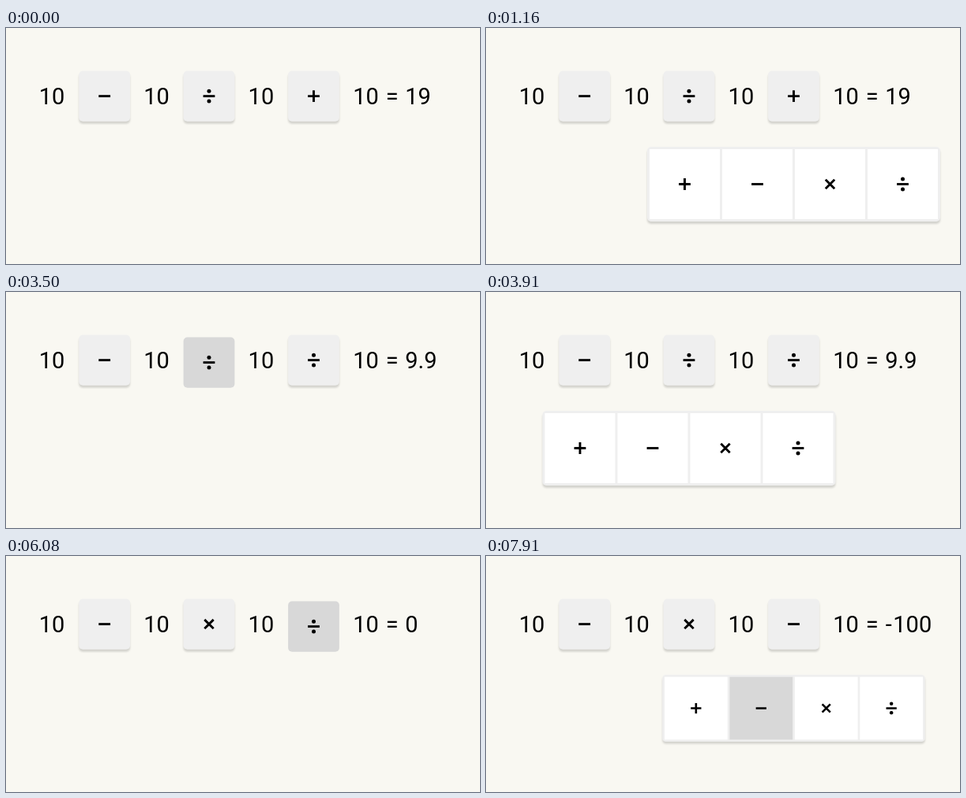
Recreate the animation shown at these times as an HTML page. Size 600 by 300 pixels, loop 8000 ms.

```html
<!DOCTYPE html>
<html lang="en">
<head>
<meta charset="utf-8">
<title>Operator picker</title>
<style>
  html, body { margin: 0; width: 100%; height: 100%; overflow: hidden; background: #f9f8f2; }
  svg { display: block; width: 600px; height: 300px; }
  text { font: 29px Roboto, Arial, sans-serif; fill: #000; }
  .raised { fill: #efefef; filter: drop-shadow(0 3px 1px rgba(0, 0, 0, .15)); }
  .pressed .raised { fill: #d8d8d8; filter: none; }
  .cell { fill: #fff; }
  .cell.on { fill: #d8d8d8; }
  .sign { fill: none; stroke: #000; stroke-width: 2.9; }
  .dot { fill: #000; stroke: none; }
</style>
</head>
<body>
<svg viewBox="0 0 600 300">
  <defs>
    <path id="plus" class="sign" d="M-7.4 0H7.4M0-7.4V7.4"/>
    <path id="minus" class="sign" d="M-7.4 0H7.4"/>
    <path id="times" class="sign" d="M-5.7-5.7L5.7 5.7M-5.7 5.7L5.7-5.7"/>
    <g id="divide">
      <path class="sign" d="M-7.4 0H7.4"/>
      <circle class="dot" cy="-6.4" r="2.5"/>
      <circle class="dot" cy="6.4" r="2.5"/>
    </g>
  </defs>
  <g id="row"></g>
  <text x="488.8" y="96.7" text-anchor="middle">=</text>
  <text id="result" x="505.2" y="96.7"></text>
  <g id="popup"></g>
</svg>
<script>
const LOOP = 8000;
const OPS = ['plus', 'minus', 'times', 'divide'];
const CENTERS = [124.7, 257, 389.5];
const CELL = 89, GAP = 3, TOP = 151, SMALL = 0.896;
const START = { ops: ['minus', 'divide', 'plus'], result: '19' };

// times: press, release, popup small, popup full, pick, shrink, hide
const ROUNDS = [
  { button: 2, pick: 'divide', result: '9.9', times: [750, 1000, 1080, 1160, 1830, 2580, 2660] },
  { button: 1, pick: 'times', result: '0', times: [3500, 3750, 3830, 3910, 4580, 5330, 5410] },
  { button: 2, pick: 'minus', result: '-100', times: [6080, 6330, 6410, 6500, 7160, 7910, LOOP] }
];

const $ = id => document.getElementById(id);

function add(parent, tag, attrs) {
  const el = document.createElementNS('http://www.w3.org/2000/svg', tag);
  for (const key in attrs) el.setAttribute(key, attrs[key]);
  return parent.appendChild(el);
}

[41.8, 174.2, 306.6, 439.2].forEach(x => {
  add($('row'), 'text', { x, y: 96.7 }).textContent = '10';
});

const buttons = CENTERS.map(x => {
  const group = add($('row'), 'g', {});
  add(group, 'rect', { class: 'raised', x: x - 32.4, y: 54.5, width: 64.8, height: 64.3, rx: 5 });
  const sign = add(group, 'use', { x, y: 86.6 });
  return { group, sign };
});

// The popup is built around its top centre.
const popup = $('popup');
const pitch = CELL + GAP;
const width = 4 * pitch + GAP;
add(popup, 'rect', { class: 'raised', x: -width / 2, y: 0, width, height: CELL + 2 * GAP, rx: 5 });
const cells = OPS.map((op, i) => {
  const x = GAP - width / 2 + i * pitch;
  const cell = add(popup, 'rect', { class: 'cell', x, y: GAP, width: CELL, height: CELL });
  add(popup, 'use', { href: '#' + op, x: x + CELL / 2, y: GAP + CELL / 2 });
  return cell;
});

function stateAt(t) {
  const state = { ops: [...START.ops], result: START.result, pressed: -1, scale: 0, at: 0, picked: '' };
  for (const { button, pick, result, times } of ROUNDS) {
    const [press, release, small, full, choose, shrink, hide] = times;
    if (t < press) break;
    if (t < release) state.pressed = button;
    if (t >= choose) {
      state.ops[button] = pick;
      state.result = result;
    }
    if (t >= small && t < hide) {
      state.at = button;
      state.scale = t >= full && t < shrink ? 1 : SMALL;
      state.picked = t >= choose ? pick : '';
    }
  }
  return state;
}

function draw(t) {
  const s = stateAt(t);
  buttons.forEach(({ group, sign }, i) => {
    const down = s.pressed === i;
    group.setAttribute('class', down ? 'pressed' : '');
    group.setAttribute('transform', `translate(0 ${down ? 3 : 0})`);
    sign.setAttribute('href', '#' + s.ops[i]);
  });
  $('result').textContent = s.result;
  $('result').setAttribute('dx', s.result < 0 ? '0.6 1.5' : '0');
  popup.setAttribute('visibility', s.scale ? 'visible' : 'hidden');
  popup.setAttribute('transform', `translate(${CENTERS[s.at]} ${TOP}) scale(${s.scale || 1})`);
  cells.forEach((cell, i) => cell.classList.toggle('on', OPS[i] === s.picked));
}

const begin = performance.now();
function tick() {
  draw((performance.now() - begin) % LOOP);
  requestAnimationFrame(tick);
}
tick();
</script>
</body>
</html>
```
